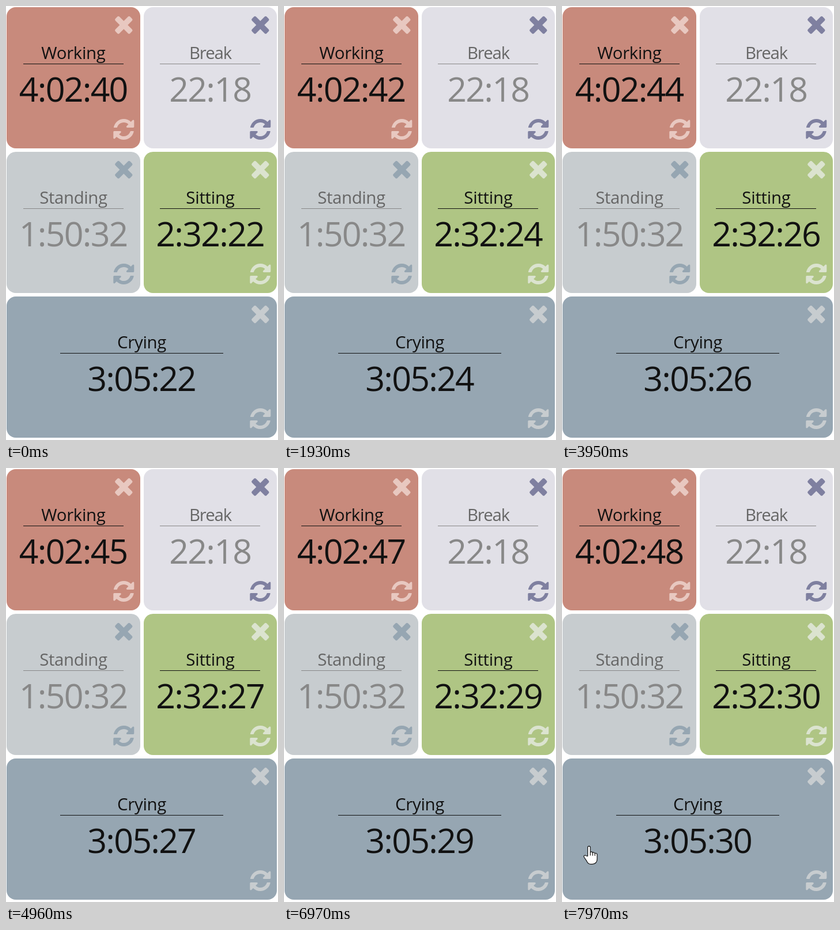
Recreate the animation shown at these times as an HTML page. Size 472 by 753 pixels, loop 8 s.

```html
<!DOCTYPE html>
<html lang="en">
<head>
<meta charset="utf-8">
<title>Timers</title>
<style>
  html, body { margin: 0; width: 100%; height: 100%; overflow: hidden; background: #fff; }
  svg { display: block; width: 472px; height: 753px; }
  text { font-family: "Open Sans", "Noto Sans", sans-serif; text-anchor: middle; fill: #111; }
  .label { font-size: 29.4px; }
  .time { font-size: 59px; letter-spacing: -1.75px; }
  .rule { fill: #111; }
  .idle .label { fill: #666; }
  .idle .time, .idle .rule { fill: #888; }
</style>
</head>
<body>
<svg id="stage" viewBox="0 0 472 753">
  <defs>
    <g id="close">
      <rect id="bar" x="-18" y="-4.9" width="36" height="9.8" rx="2.5" transform="rotate(45)"/>
      <use href="#bar" transform="rotate(90)"/>
    </g>
    <g id="reset">
      <path id="arrow" transform="scale(.02344) translate(-896 -896)" d="M1639 1056q0 5-1 7-64 268-268 434.5t-478 166.5q-146 0-282.5-55t-243.5-157l-129 129q-19 19-45 19t-45-19-19-45v-448q0-26 19-45t45-19h448q26 0 45 19t19 45-19 45l-137 137q71 66 161 102t187 36q134 0 250-65t186-179q11-17 53-117 8-23 30-23h192q13 0 22.5 9.5t9.5 22.5z"/>
      <use href="#arrow" transform="rotate(180)"/>
    </g>
  </defs>
  <g id="tiles"></g>
  <g id="hand" visibility="hidden" stroke="#111" stroke-width="1.2" stroke-linejoin="round" stroke-linecap="round">
    <path fill="#fff" d="M7.6 18.5V3.5a2.3 2.3 0 0 1 4.6 0V12c.3-1.7 4-1.5 4 .8c.4-1.5 3.9-1.1 3.9 1.2c.5-1.3 3.9-.8 3.9 1.9V23.5c0 5-3 8.8-8.3 8.8h-3c-4 0-5.6-2.6-7-5.6L1.2 20c-1-2.6 2-4 4-2z"/>
    <path fill="none" d="M12.2 12v5M16.2 12.8v4.4M20.1 14v3.4"/>
  </g>
</svg>
<script>
const LOOP = 8000;
const TICKS = [920, 1930, 2940, 3950, 4960, 5950, 6970, 7970];
const HAND = [[7440, 3, 619], [7515, 25, 641], [7590, 37, 655]];

const tiles = [
  { name: "Working", secs: 14560, x: 1, y: 2, w: 232, rule: 174, track: -.3, bg: "#c88a7c", icon: "#e8c8c0", on: true },
  { name: "Break", secs: 1338, x: 239, y: 2, w: 231, rule: 174, track: -1.1, bg: "#e1e0e7", icon: "#7f80a0" },
  { name: "Standing", secs: 6632, x: 1, y: 253, w: 232, rule: 174, track: -.4, bg: "#c7cccf", icon: "#96a6b2" },
  { name: "Sitting", secs: 9142, x: 239, y: 253, w: 231, rule: 174, track: -.2, bg: "#afc584", icon: "#dbe3cf", on: true },
  { name: "Crying", secs: 11122, x: 1, y: 504, w: 469, rule: 283, track: -.3, bg: "#96a6b2", icon: "#c7cccf", on: true }
];

const pad = n => String(n).padStart(2, "0");

function format(secs) {
  const h = Math.floor(secs / 3600), m = Math.floor(secs / 60) % 60;
  return (h ? h + ":" + pad(m) : m) + ":" + pad(secs % 60);
}

function tileMarkup(t) {
  const mid = t.w / 2, side = t.w - 28.7;
  return `<g class="${t.on ? "" : "idle"}" transform="translate(${t.x} ${t.y})">
    <rect width="${t.w}" height="245" rx="16" fill="${t.bg}"/>
    <g fill="${t.icon}">
      <use href="#close" x="${side}" y="31"/>
      <use href="#reset" x="${side}" y="212"/>
    </g>
    <text class="label" x="${mid}" y="90" style="letter-spacing:${t.track}px">${t.name}</text>
    <rect class="rule" x="${Math.floor(mid - t.rule / 2)}" y="98" width="${t.rule}" height="1"/>
    <text class="time" x="${mid - .3}" y="163.5">${format(t.secs)}</text>
  </g>`;
}

document.getElementById("tiles").innerHTML = tiles.map(tileMarkup).join("");
const clocks = document.querySelectorAll(".time");
const hand = document.getElementById("hand");
const start = performance.now();

function draw() {
  const now = (performance.now() - start) % LOOP;
  const passed = TICKS.filter(t => t <= now).length;
  tiles.forEach((t, i) => {
    if (t.on) clocks[i].textContent = format(t.secs + passed);
  });
  const spot = HAND.filter(p => p[0] <= now).pop();
  hand.setAttribute("visibility", spot ? "visible" : "hidden");
  if (spot) hand.setAttribute("transform", `translate(${spot[1]} ${spot[2]})`);
  requestAnimationFrame(draw);
}
draw();
</script>
</body>
</html>
```
